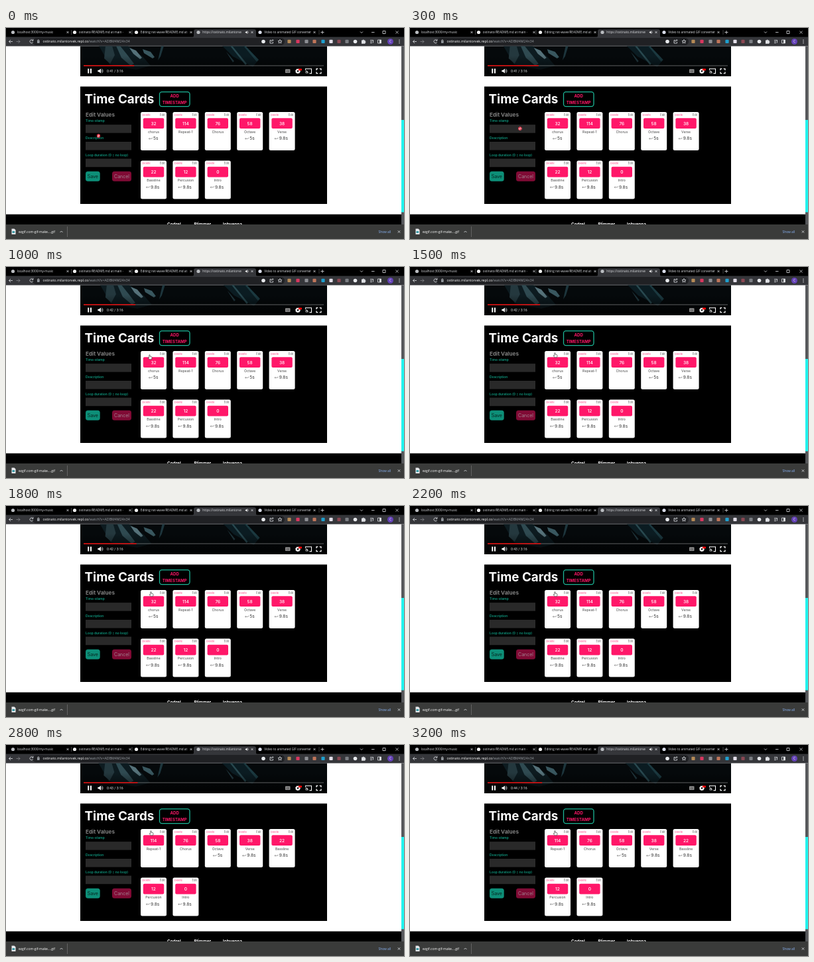
Animation, 600 px wide and 319 px high, one loop 3.3 s. Source, as an HTML page:

```html
<!DOCTYPE html>
<html lang="en">
<head>
<meta charset="utf-8">
<title>Time Cards</title>
<style>
html, body { margin: 0; width: 100%; height: 100%; overflow: hidden; background: #fff }
svg { display: block; width: 600px; height: 319px; font-family: Inter, "Open Sans", sans-serif }
.ui { font-family: "Open Sans", "Noto Sans", sans-serif }
.line { fill: none; stroke: #dfe1e5; stroke-width: .8 }
</style>
</head>
<body>
<svg id="stage" viewBox="0 0 600 319"></svg>
<script>
const LOOP = 3300, REMOVED_AT = 2500, HOVER_AT = 900;
const PINK = '#ff1769', TEAL = '#0d8f78', GREY = '#9aa0a6';
const CARDS = [
  [32, 'chorus', '5s'], [114, 'Repeat-1', ''], [76, 'Chorus', ''], [58, 'Octave', '5s'],
  [38, 'Verse', '9.8s'], [22, 'Bassline', '9.8s'], [12, 'Percusion', '9.8s'], [0, 'Intro', '9.8s']
];
// Pointer path: time, x, y
const PATH = [[0, 139.5, 163], [600, 192.3, 141], [1000, 217, 136.5], [1500, 219, 133.5], [LOOP, 219, 133.5]];

const rect = (x, y, w, h, fill, r = 0, more = '') =>
  `<rect x="${x}" y="${y}" width="${w}" height="${h}" rx="${r}" fill="${fill}" ${more}/>`;
const dot = (x, y, r, fill) => `<circle cx="${x}" cy="${y}" r="${r}" fill="${fill}"/>`;
const text = (x, y, size, fill, s, more = '') =>
  `<text x="${x}" y="${y}" font-size="${size}" fill="${fill}" ${more}>${s}</text>`;
const line = (d, more = '') => `<path class="line" d="${d}" ${more}/>`;
const shape = (d, fill) => `<path d="${d}" fill="${fill}"/>`;
const cross = (x, y, r = 1.5) => line(`M${x - r} ${y - r}l${2 * r} ${2 * r}m0 ${-2 * r}l${-2 * r} ${2 * r}`);
const speaker = (x, y, k) => `<g transform="translate(${x} ${y}) scale(${k})">` +
  shape('M-4-1.5h2l3-2.5v8l-3-2.5h-2z', '#fff') + line('M2-2q2 2 0 4M2.6-3.7q4 3.7 0 7.4') + '</g>';
const MID = ' text-anchor="middle" ', BOLD = ' font-weight="700" ';

function tabs() {
  const tab = (x, end, color, title) =>
    dot(x, 6.5, 2.6, color) + text(x + 6.3, 8.3, 4.7, '#dfe1e5', title) + cross(end, 6.5);
  return '<g class="ui">' + rect(0, 0, 600, 14, '#000') +
    shape('M281 14q2 0 2-3v-6q0-3 3-3h88q3 0 3 3v6q0 3 2 3z', '#35363a') +
    tab(10.5, 93, '#b9bcc0', 'localhost:3000/my-music') +
    tab(103.5, 187, '#f1f1f1', 'ostinato/README.md at main ·') +
    tab(196.5, 279, '#f1f1f1', 'Editing nxt-wave/README.md at') +
    tab(290, 371, '#b9bcc0', 'https://ostinato.milantorve') +
    speaker(363, 6.5, .55) + tab(383, 465, '#d8dce8', 'Video to animated GIF converter') +
    line('M98.500 3v7M190 3v7M472 3v7', 'opacity=".35"') +
    line('M477 4v5M474.500 6.500h5M534 5.500l2 2 2-2M551 6.500h4.500M568 4.500h4v4h-4z') + cross(589.5, 6.5, 2) + '</g>';
}

function toolbar() {
  const icons = [[427, '#b58a55'], [440, '#d8375f'], [453, '#8d8f94'], [465, '#c0765a'],
    [478, '#1fa0cf'], [490, '#e4e0ea'], [502, '#8a4752'], [514, '#7b7e83']];
  return '<g class="ui">' + rect(0, 13.5, 600, 14, '#35363a') + rect(40, 15, 380, 11, '#202124', 5.5) +
    line('M10 20.500H4.500l2.500-2.500M4.500 20.500l2.500 2.500') +
    line('M15.500 20.500H21l-2.500-2.500M21 20.500l-2.500 2.500', 'opacity=".45"') +
    line('M40.500 18.800a2.500 2.500 0 1 0 .3 2.500M41 17v2.200h-2.200') +
    rect(47, 19.8, 3.6, 3, GREY, .4) + line('M47.700 20v-1a1.100 1.100 0 0 1 2.200 0v1') +
    text(55.5, 22.2, 5.25, GREY, '<tspan fill="#fff">ostinato.milantorvek.repl.co</tspan>/watch?v=ADBM4M24n34') +
    dot(388, 20.5, 2.8, '#e8eaed') + dot(526.5, 20.5, 2.8, '#e8eaed') +
    icons.map(([x, c]) => rect(x - 2.6, 17.8, 5.2, 5.2, c, 1)).join('') +
    line('M400 18.500h-2v4.500h4.500v-2M399.500 21q.5-2.500 3-2.500M401.500 17l1.500 1.500-1.500 1.500') +
    line('M413 17.500l.9 2h2.100l-1.600 1.400.6 2.100-2-1.200-2 1.200.6-2.100-1.600-1.400h2.100z') +
    shape('M536 18.500h1.700a1 1 0 0 1 2 0h1.800v1.700a1 1 0 0 1 0 2v1.500h-5.500z', '#dfe1e5') +
    line('M549 18.500h5M549 20.500h3M549 22.500h3M553.500 18.500v4') +
    line('M560.500 18h5v5h-5z') + rect(563, 18, 2.5, 5, '#dfe1e5') +
    dot(579.5, 20.5, 4.5, '#6542b8') + text(579.5, 22.3, 5, '#fff', 'C', MID) +
    [18.2, 20.5, 22.8].map(y => dot(593, y, .7, '#dfe1e5')).join('') + '</g>';
}

// Dark concert-like scene, only flat shapes
function video() {
  return '<clipPath id="frame"><rect x="112" y="27.5" width="372" height="45.5"/></clipPath>' +
    '<linearGradient id="shade" x2="0" y2="1"><stop stop-opacity="0"/><stop offset="1" stop-opacity=".8"/></linearGradient>' +
    '<g clip-path="url(#frame)">' + rect(112, 27, 372, 46, '#05090b') + '<g id="scene">' +
    shape('M140 27h44l22 16 12 14-22 6-40-8z', '#0d1b20') +
    shape('M150 27h10l4 14-7 13-9-8z', '#24383e') +
    shape('M166 27h6l12 15 9 12-5 3-14-12z', '#2f4a51') +
    shape('M186 30l10 4 9 11-3 2-10-8z', '#557179') +
    shape('M206 32l12 4 6 8-3 2-13-8z', '#39575f') +
    shape('M234 27h4l-5 16-4 6z', '#1d353c') +
    shape('M326 27h34l20 22-8 10-30-16z', '#0b1c22') +
    shape('M338 27h3l22 27-2 2z', '#28484f') +
    shape('M358 27h3l20 21-3 3z', '#1b3940') +
    shape('M332 36l12 14-2 2z', '#21383f') + '</g>' +
    rect(112, 42, 372, 31, 'url(#shade)') + '</g>' +
    rect(117, 56.3, 362, 1.3, '#fff', 0, 'opacity=".28"') + rect(117, 56.3, 76, 1.3, '#f00', 0, 'id="played"') +
    rect(123.3, 61.5, 2, 7, '#fff') + rect(127, 61.5, 2, 7, '#fff') + speaker(142, 65, .9) +
    '<text id="clock" x="152" y="66.900" font-size="5.200" font-family="Roboto, sans-serif" fill="#e4e4e4"></text>' +
    rect(421, 62.3, 7.5, 5.6, '#8b8b8b', .7) + text(424.7, 66.6, 4, '#111', 'cc', MID) +
    '<circle cx="440" cy="65.300" r="2.300" fill="none" stroke="#fff" stroke-width="2"/>' +
    '<circle cx="440" cy="65.300" r="3.400" fill="none" stroke="#fff" stroke-width="1" stroke-dasharray="1.335"/>' +
    rect(441, 61.5, 5, 2.8, '#f00', .6) +
    line('M451.500 63.500v-1.700h9v6.800h-3M451.500 65q3.500 0 3.500 3.600M451.500 67q1.500 0 1.500 1.600', 'style="stroke:#fff;stroke-width:1.100"') +
    line('M468 64v-2.300h2.300M472.700 61.700h2.300v2.300M475 66.300v2.300h-2.300M470.300 68.600h-2.300v-2.300', 'style="stroke:#fff;stroke-width:1.200"');
}

function panel() {
  const field = (y, label) => text(120, y, 4.9, '#0f987f', label, 'font-weight="600"') + rect(120, y + 3.8, 69, 12.6, '#292929');
  return rect(112, 88.5, 372, 177.5, '#000') +
    text(118.5, 113.7, 18.8, '#fff', 'Time Cards', BOLD) +
    rect(231.5, 96.6, 45.5, 22, '#000', 3.5, 'stroke="#1cb596" stroke-width="1.300"') +
    text(254.2, 105, 6.1, PINK, 'ADD', MID + BOLD) + text(254.2, 115.3, 6.1, PINK, 'TIMESTAMP', MID + BOLD) +
    text(120, 134, 8.1, '#808080', 'Edit Values', BOLD) +
    field(142.3, 'Time-stamp') + field(168.2, 'Description') + field(193.8, 'Loop duration (0 = no loop)') +
    rect(120, 216.8, 21.7, 15, TEAL, 3.5) + text(130.8, 226.8, 7, '#06231e', 'Save', MID) +
    rect(160, 216.8, 29, 15, '#800b35', 3.5) + text(174.5, 226.8, 7, '#a08290', 'Cancel', MID) +
    '<g id="cards"></g>';
}

function card([stamp, name, loop], i, hover) {
  const left = loop.length > 2 ? 8.4 : 12.4;
  return `<g transform="translate(${203 + 48.4 * (i % 5)} ${i < 5 ? 127 : 200.5})">` +
    rect(0, 0, 39, 58, '#fff', 2.5) +
    (hover ? '' : text(2.4, 5.7, 4.1, PINK, 'Delete', 'font-weight="300"')) +
    text(36.3, 5.7, 4.2, '#333', 'Edit', 'text-anchor="end" font-weight="300"') +
    rect(3.8, 9.3, 31.4, 15.8, PINK, 2) +
    text(19.5, 19.6, 6.6, '#fff', stamp, MID + 'font-weight="500"') +
    text(19.5, 31.6, 5.2, '#444', name, MID) +
    (loop && line(`M${left + 1.2} 39.200l-1.200 1.100 1.200 1.100m-1.200-1.100h4q1.100 0 1.100-1.500`, 'style="stroke:#555;stroke-width:.550"') +
      text(left + 6.7, 42.3, 6.6, '#333', loop)) + '</g>';
}

function footer() {
  return rect(0, 281.7, 596, 16, '#000') +
    [[253.3, 'Codrel'], [296.3, 'Plimmer'], [340.5, 'Jobvenna']]
      .map(([x, s]) => text(x, 299.3, 6.4, '#fff', s, MID + BOLD)).join('') +
    rect(596, 27.5, 4, 270, '#55575a') + rect(596, 139, 4, 139.5, '#20f3ee') +
    '<g class="ui">' + rect(0, 297, 600, 22, '#3a3b3a') +
    shape('M8.500 303.500h4l2 2v6.500h-6z', '#e8eaed') + rect(9.5, 307, 3.6, 3, '#3c9aa6') +
    text(19, 309.8, 5, '#fff', 'ezgif.com-gif-make....gif') +
    line('M81.500 309l2-2 2 2') + line('M92.500 300v16', 'opacity=".3"') +
    text(561.5, 309.8, 4.9, '#8ab4f8', 'Show all') + cross(592.5, 308, 1.7) + '</g>';
}

const pointers = '<g id="blocked">' + dot(0, 0, 2.6, '#fff') +
  '<circle r="2.100" fill="#fff" stroke="#d3162c" stroke-width="1.100"/><path d="M-1.500-1.500l3 3" stroke="#d3162c" stroke-width="1"/></g>' +
  '<g id="hand"><path d="M-1.200-3.500q.7-.8 1.300 0v2.200l2.500.7q.7.3.5 1.200l-.7 2.600h-3.200l-2-2.700q.3-1 1.600-.1z" fill="#fff" stroke="#222" stroke-width=".600"/></g>';

const $ = id => document.getElementById(id);
$('stage').innerHTML = tabs() + rect(0, 27, 600, 270, '#fff') + toolbar() + video() + panel() + footer() + pointers;

function pointerAt(t) {
  const i = PATH.findIndex(p => p[0] > t), [t0, x0, y0] = PATH[i - 1], [t1, x1, y1] = PATH[i];
  const k = (t - t0) / (t1 - t0);
  return [x0 + (x1 - x0) * k, y0 + (y1 - y0) * k];
}

let state;
function draw(now) {
  const t = Math.floor(now % LOOP / 100) * 100;
  const [x, y] = pointerAt(t), overCards = x > 199;
  $('blocked').style.display = overCards ? 'none' : '';
  $('hand').style.display = overCards ? '' : 'none';
  $(overCards ? 'hand' : 'blocked').setAttribute('transform', `translate(${x} ${y})`);

  const seconds = 41.1 + t / 1000;
  $('clock').textContent = `0:${Math.floor(seconds)} / 3:16`;
  $('played').setAttribute('width', 362 * (seconds + .2) / 196);
  $('scene').setAttribute('transform', `translate(${2 * Math.sin(t / 800)} 0)`);

  const hover = t >= HOVER_AT, removed = t >= REMOVED_AT, next = `${hover}${removed}`;
  if (next !== state) {
    state = next;
    $('cards').innerHTML = CARDS.slice(+removed).map((c, i) => card(c, i, hover && !i)).join('');
  }
  requestAnimationFrame(draw);
}
requestAnimationFrame(draw);
</script>
</body>
</html>
```
